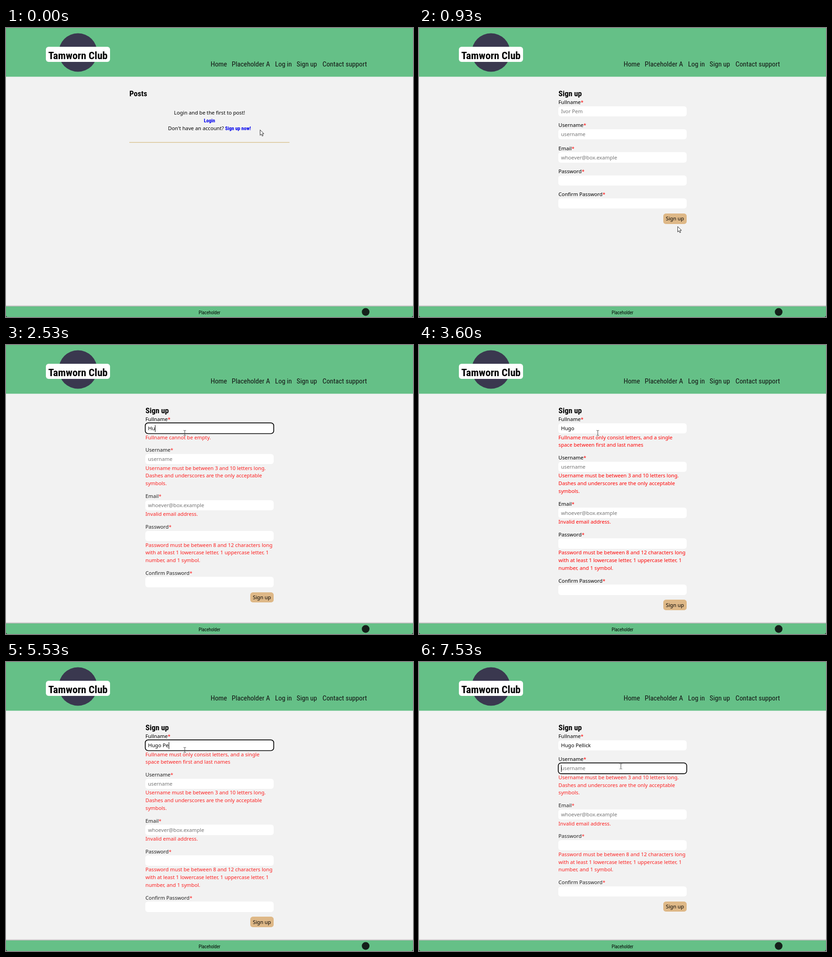
Write an HTML page that moves like this. It is 888 px wide and 631 px high and loops after 8 s.

```html
<!DOCTYPE html>
<html lang="en">
<head>
<meta charset="utf-8">
<title>Sign up form</title>
<style>
  html, body { margin: 0; width: 100%; height: 100%; overflow: hidden; background: #f2f2f2; }
  svg { display: block; width: 888px; height: 631px; }
  text { font: 11.2px "Noto Sans", "Open Sans", sans-serif; white-space: pre; }
  .hint { fill: #757575; }
  .error, .star { fill: #f00; }
  .link { fill: #00e; }
  .dim { opacity: .87; }
</style>
</head>
<body>
<svg id="stage" viewBox="0 0 888 631" xmlns="http://www.w3.org/2000/svg">
  <defs>
    <linearGradient id="shade" x1="0" y1="0" x2="0" y2="1">
      <stop offset="0" stop-color="#000" stop-opacity="0"/>
      <stop offset="1" stop-color="#000" stop-opacity=".3"/>
    </linearGradient>
  </defs>
  <rect width="888" height="631" fill="#f2f2f2"/>
  <rect width="888" height="106.4" fill="#65c087"/>
  <circle cx="157" cy="53.5" r="42" fill="#3a384f"/>
  <rect x="87" y="41" width="140" height="33" rx="6" fill="#fff"/>
  <rect y="605" width="888" height="3" fill="url(#shade)"/>
  <rect y="608" width="888" height="23" fill="#65c087"/>
  <circle cx="784.7" cy="620" r="8.4" fill="#14201a"/>
  <path d="M0 627v4h4q-4 0-4-4M888 627v4h-4q4 0 4-4" fill="#222"/>
  <g id="chrome"></g>
  <g id="page"></g>
  <rect id="caret" width="1" height="15"/>
  <path id="arrow" d="M0 0V11.8L2.7 9.2 4.6 13.5 6.6 12.6 4.8 8.4H8.4Z" fill="#fff" stroke="#111" stroke-width=".9" stroke-linejoin="round"/>
  <path id="beam" d="M-2.6-5.6Q-.4-5.6 0-4.6Q.4-5.6 2.6-5.6M0-4.6V4.6M-2.6 5.6Q-.4 5.6 0 4.6Q.4 5.6 2.6 5.6" fill="none" stroke="#444" stroke-width="1"/>
</svg>
<script>
const LOOP = 8000, LINE = 16.8, LEFT = 304, WIDTH = 280, BOX = 22.4;
const get = id => document.getElementById(id);
const stage = get('stage'), page = get('page'), caret = get('caret');

// Pick the narrowest installed face for the condensed headings.
const faces = ['Noto Sans', 'Open Sans', 'Roboto', 'Roboto Condensed', 'Liberation Sans Narrow', 'Liberation Sans'];
const fontStyle = (face, weight, size) =>
  `font-family:'${face}',sans-serif;font-stretch:62.5%;font-weight:${weight};font-size:${size}px`;

function measure(str, face, weight) {
  const probe = document.createElementNS(stage.namespaceURI, 'text');
  probe.textContent = str;
  probe.setAttribute('style', fontStyle(face, weight, 100));
  stage.append(probe);
  const width = probe.getComputedTextLength() / 100;
  probe.remove();
  return width;
}

const navWord = 'Contact support';
const face = faces.reduce((a, b) => measure(navWord, b, 400) < measure(navWord, a, 400) ? b : a);
const ratio = {
  400: 97 / 16.8 / measure(navWord, face, 400),
  700: 51 / 16.8 / measure('Sign up', face, 700)
};

// Baselines and boxes sit on whole pixels, as in a page layout.
const narrow = (x, y, str, size, weight = 400, extra = '') =>
  `<text x="${x}" y="${Math.round(y)}" ${extra} style="${fontStyle(face, weight, size * ratio[weight])}">${str}</text>`;
const text = (x, y, str, cls = '', extra = '') =>
  `<text x="${x}" y="${Math.round(y)}" class="${cls}" ${extra}>${str}</text>`;
const middle = 'text-anchor="middle"';

function box(x, y, width, fill) {
  const top = Math.round(y), height = Math.round(y + BOX) - top;
  return `<rect x="${x}" y="${top}" width="${width}" height="${height}" rx="5.6" fill="${fill}"/>`;
}

get('chrome').innerHTML =
  narrow(157, 68, 'Tamworn Club', 22.6, 700, middle) +
  [[446.5, 'Home'], [492.5, 'Placeholder A'], [587, 'Log in'], [634, 'Sign up'], [690.5, navWord]]
    .map(([x, word]) => narrow(x, 84, word, 16.8, 400, 'fill="#111"')).join('') +
  narrow(444, 625, 'Placeholder', 11.2, 400, middle);

const fields = [
  ['Fullname', 'Ivor Pem'],
  ['Username', 'username'],
  ['Email', 'whoever@box.example'],
  ['Password', ''],
  ['Confirm Password', '']
];
const ruleErrors = [
  ['Username must be between 3 and 10 letters long.', 'Dashes and underscores are the only acceptable', 'symbols.'],
  ['Invalid email address.'],
  ['Password must be between 8 and 12 characters long', 'with at least 1 lowercase letter, 1 uppercase letter, 1', 'number, and 1 symbol.'],
  []
];
const emptyName = ['Fullname cannot be empty.'];
const badName = ['Fullname must only consist letters, and a single', 'space between first and last names'];

const name = 'Hugo Pellick';
const keyTimes = [2270, 2530, 3270, 3400, 5000, 5330, 5530, 5600, 5730, 5870, 5930, 6000];
const focusSpans = [[1600, 3530, 0], [4600, 6130, 0], [7270, LOOP, 1]];
const pointer = [
  [0, 554.4, 222.5], [270, 514, 218], [670, 514, 218], [930, 564.4, 433.5], [1000, 560, 419],
  [1200, 560, 419], [1530, 390, 192], [6730, 390, 192], [7130, 440.5, 213], [7200, 440.5, 213],
  [7270, 440.5, 228], [LOOP, 440.5, 228]
];

function pointerAt(t) {
  const i = Math.max(1, pointer.findIndex(p => p[0] >= t));
  const [t0, x0, y0] = pointer[i - 1], [t1, x1, y1] = pointer[i];
  const k = (t - t0) / (t1 - t0);
  return [x0 + (x1 - x0) * k, y0 + (y1 - y0) * k];
}

function errorsAt(t) {
  if (t < 1200) return fields.map(() => []);
  return [t < 3530 ? emptyName : t < 6130 ? badName : [], ...ruleErrors];
}

const postsPage = () =>
  narrow(269.3, 149, 'Posts', 16.8, 700) +
  text(444, 189, 'Login and be the first to post!', '', middle) +
  narrow(444, 206, 'Login', 10.9, 700, middle + ' class="link"') +
  text(353.5, 223, "Don't have an account?") +
  narrow(478, 223, 'Sign up now!', 10.9, 700, 'class="link"') +
  '<rect x="269" y="249" width="349.5" height="1.4" fill="#d8c08d"/>';

function formPage(rows, focus, ring, typed) {
  let out = narrow(304.3, 149, 'Sign up', 16.8, 700);
  rows.forEach(({ y, errors }, i) => {
    const [label, hint] = fields[i];
    const value = i === 0 ? typed : '';
    const labelTone = focus >= 0 && i > focus ? 'dim' : '';
    const errorTone = focus >= 0 && i >= focus ? 'error dim' : 'error';
    out += text(304.3, y, `${label}<tspan class="star">*</tspan>`, labelTone);
    out += box(LEFT, y + 4.6, WIDTH, '#fff');
    if (i === focus)
      out += `<rect x="${LEFT - .2}" y="${y + 4.1}" width="${WIDTH + .4}" height="${BOX + 1}" rx="6.2" fill="none" stroke="#000" stroke-width="1.7" opacity="${ring}"/>`;
    out += text(309.9, y + 19.9, value || hint, value ? '' : 'hint');
    errors.forEach((line, n) => out += text(304.3, y + 39.5 + n * LINE, line, errorTone));
  });
  const last = rows[rows.length - 1].y;
  return out + box(533, last + 37.7, 51, '#deb887') + text(558.3, last + 53, 'Sign up', '', middle);
}

function render(t) {
  const onForm = t >= 400;
  const span = focusSpans.find(([from, to]) => t >= from && t < to);
  const focus = span ? span[2] : -1;
  const typed = name.slice(0, keyTimes.filter(k => t >= k).length);

  let y = 166;
  const rows = errorsAt(t).map(errors => {
    const row = { y, errors };
    y += 50.35 + errors.length * LINE;
    return row;
  });

  const ring = !span || span[0] === 4600 ? 1 : Math.min(1, (t - span[0] + 70) / 270);
  page.innerHTML = onForm ? formPage(rows, focus, ring, typed) : postsPage();

  const blinkOff = t >= 3070 && t < 3270;
  const showCaret = focus >= 0 && ring === 1 && !blinkOff;
  caret.style.display = showCaret ? '' : 'none';
  if (showCaret) {
    const input = page.querySelectorAll('text')[2];
    const end = focus === 0 && typed ? input.getComputedTextLength() : 0;
    caret.setAttribute('x', Math.round(309.9 + end));
    caret.setAttribute('y', Math.round(rows[focus].y + 8.5));
  }

  const [px, py] = pointerAt(t);
  const inField = onForm && px > LEFT && px < LEFT + WIDTH &&
    rows.some(r => py >= r.y + 4.5 && py <= r.y + 4.5 + BOX);
  for (const [id, on] of [['arrow', !inField], ['beam', inField]]) {
    get(id).setAttribute('transform', `translate(${px} ${py})`);
    get(id).style.display = on ? '' : 'none';
  }
}

// The screen refreshes fifteen times a second.
const start = performance.now();
let shown = -1;
function loop() {
  const tick = Math.floor(((performance.now() - start) % LOOP + 4) * 15 / 1000) % 120;
  if (tick !== shown) {
    shown = tick;
    render(Math.round(tick * 20 / 3) * 10);
  }
  requestAnimationFrame(loop);
}
loop();
</script>
</body>
</html>
```
